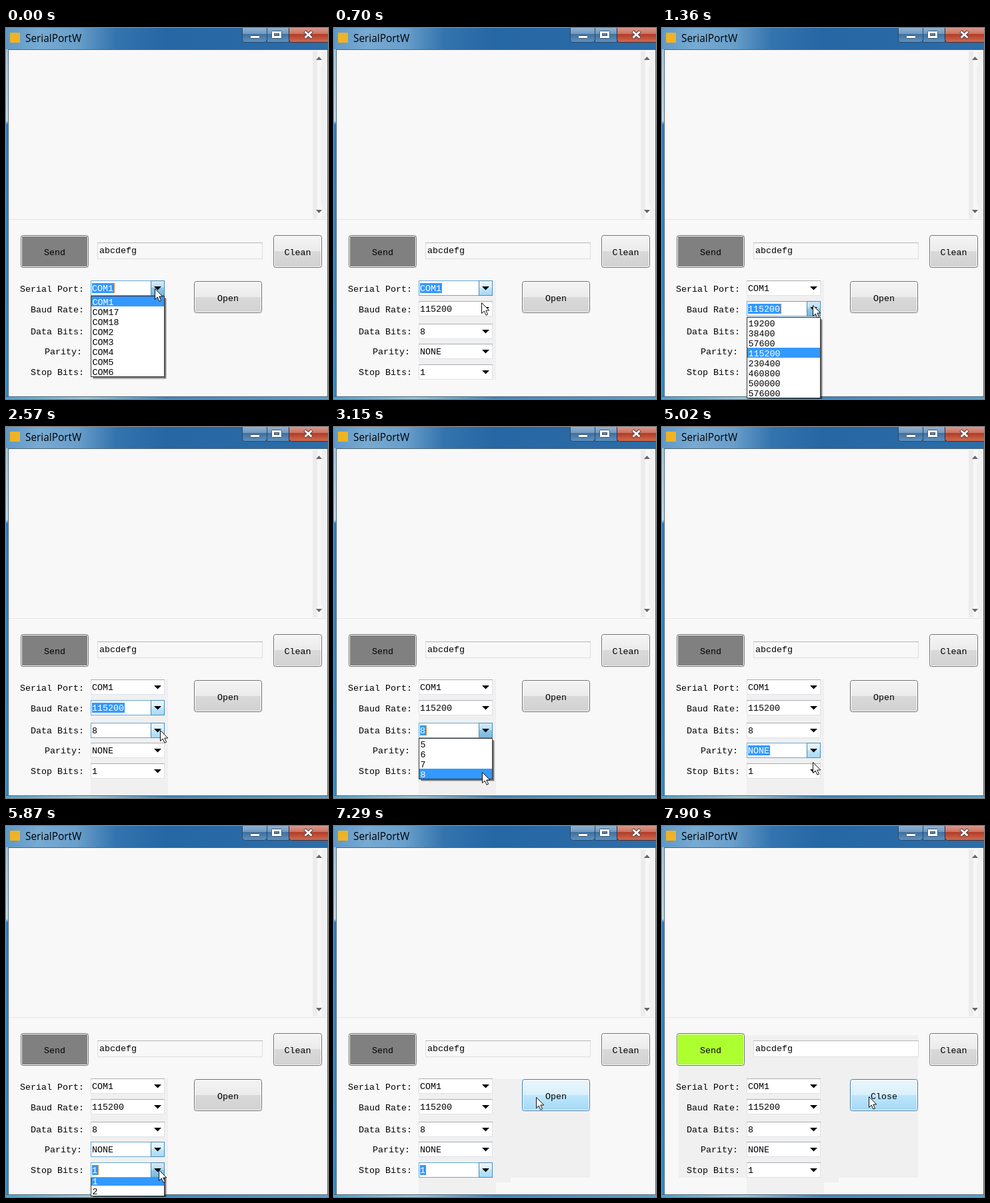
Recreate the animation shown at these times as an HTML page. Size 483 px wide and 557 px high, loop 8 s.

```html
<!DOCTYPE html>
<html lang="en">
<head>
<meta charset="utf-8">
<title>SerialPortW</title>
<style>
  html, body { margin: 0; width: 100%; height: 100%; overflow: hidden; }
  svg { display: block; width: 483px; height: 557px; }
  text { font: 13.333px "Liberation Mono", monospace; white-space: pre; }
  .title { font: 15.4px "Open Sans", "Noto Sans", sans-serif; }
</style>
</head>
<body>
<svg viewBox="0 0 483 557">
  <defs>
    <linearGradient id="bar">
      <stop offset="0" stop-color="#5f98c8"/><stop offset=".1" stop-color="#78aad2"/>
      <stop offset=".22" stop-color="#699fcb"/><stop offset=".34" stop-color="#3474ae"/>
      <stop offset=".5" stop-color="#2567a4"/><stop offset="1" stop-color="#2d6da8"/>
    </linearGradient>
    <linearGradient id="side" x2="0" y2="1">
      <stop offset="0" stop-color="#9cc3e0"/><stop offset=".25" stop-color="#c6dcec"/>
      <stop offset=".26" stop-color="#2f7fc4"/><stop offset="1" stop-color="#2c8fcb"/>
    </linearGradient>
    <linearGradient id="foot">
      <stop offset="0" stop-color="#4fa5d0"/><stop offset=".25" stop-color="#9cc9d8"/>
      <stop offset=".5" stop-color="#3e88bd"/><stop offset="1" stop-color="#5ca3cf"/>
    </linearGradient>
    <linearGradient id="glass" x2="0" y2="1">
      <stop offset="0" stop-color="#9dbdd9"/><stop offset=".48" stop-color="#7199c0"/>
      <stop offset=".5" stop-color="#3d6f9f"/><stop offset="1" stop-color="#5f93bf"/>
    </linearGradient>
    <linearGradient id="red" x2="0" y2="1">
      <stop offset="0" stop-color="#e0a699"/><stop offset=".48" stop-color="#cb7463"/>
      <stop offset=".5" stop-color="#b23a25"/><stop offset="1" stop-color="#cf6d50"/>
    </linearGradient>
    <linearGradient id="plain" x2="0" y2="1">
      <stop offset="0" stop-color="#f4f4f4"/><stop offset=".49" stop-color="#ebebeb"/>
      <stop offset=".5" stop-color="#d9d9d9"/><stop offset="1" stop-color="#d2d2d2"/>
    </linearGradient>
    <linearGradient id="hot" x2="0" y2="1">
      <stop offset="0" stop-color="#eaf6fd"/><stop offset=".49" stop-color="#d9f0fc"/>
      <stop offset=".5" stop-color="#bee6fd"/><stop offset="1" stop-color="#a7d9f5"/>
    </linearGradient>
    <linearGradient id="down" x2="0" y2="1">
      <stop offset="0" stop-color="#d6ebf7"/><stop offset=".49" stop-color="#b5ddf2"/>
      <stop offset=".5" stop-color="#8cc8e9"/><stop offset="1" stop-color="#78b8dc"/>
    </linearGradient>
  </defs>
  <g id="stage"></g>
</svg>
<script>
const LOOP = 8000;
const stage = document.getElementById('stage');

// Screen updates come in bursts: first time, last time, count.
const BURSTS = [
  [280, 1210, 8], [1360, 1750, 4], [2020, 2570, 5], [2720, 3020, 3], [3150, 3150, 1],
  [3420, 3990, 5], [4130, 4410, 3], [4560, 4720, 2], [5020, 5870, 7], [6030, 6170, 2],
  [6570, 7290, 6], [7440, 7590, 2], [7740, 7900, 2]
];
const STEPS = [0];
for (const [a, b, n] of BURSTS)
  for (let i = 0; i < n; i++) STEPS.push(Math.round(a + (n > 1 ? (b - a) * i / (n - 1) : 0)));

// Pointer path: time, x, y.
const PATH = [
  [0, 223, 391], [420, 219, 409], [560, 219, 410], [1080, 227, 419], [1360, 226, 416],
  [1500, 225, 440], [1750, 222, 486], [2020, 222, 486], [2570, 231, 455], [2870, 230, 455],
  [3150, 222, 518], [3420, 222, 518], [3990, 229, 482], [4270, 229, 484], [4410, 226, 503],
  [5020, 226, 503], [5560, 229, 515], [6170, 229, 517], [6570, 228, 529], [6860, 250, 515],
  [7290, 303, 407], [7590, 310, 406], [7900, 310, 406]
];

// hot / sel / open are [from, to] in ms; first is the top of the list's first row.
const COMBOS = [
  { y: 379, value: 'COM1', items: ['COM1', 'COM17', 'COM18', 'COM2', 'COM3', 'COM4', 'COM5', 'COM6'],
    first: 403, hot: [0, 1360], sel: [0, 1360], open: [0, 540] },
  { y: 410, value: '115200', items: ['19200', '38400', '57600', '115200', '230400', '460800', '500000', '576000'],
    first: 435, hot: [940, 3150], sel: [1360, 2870], open: [1360, 2020] },
  { y: 444, value: '8', items: ['5', '6', '7', '8'],
    first: 468, hot: [2430, 4720], sel: [2870, 4270], open: [2870, 3420] },
  { y: 474, value: 'NONE', items: ['NONE', 'ODD', 'EVEN'],
    first: 498, hot: [3840, 6170], sel: [4270, 5870], open: [4270, 5020] },
  { y: 505, value: '1', items: ['1', '2'],
    first: 525, hot: [5440, 7740], sel: [5870, 7740], open: [5870, 6570] }
];

// Repainted background areas: time, x, y, right, bottom.
const REPAINTS = [
  [280, 127, 379, 243, 528], [1360, 127, 379, 243, 557], [6850, 243, 380, 265, 535],
  [7140, 243, 380, 384, 528], [7740, 25, 314, 384, 528]
];

const within = ([a, b], t) => t >= a && t < b;
const rect = (x, y, w, h, fill, more = '') =>
  `<rect x="${x}" y="${y}" width="${w}" height="${h}" fill="${fill}" ${more}/>`;
const box = (x, y, w, h, fill, line, r = 0) =>
  rect(x + .5, y + .5, w - 1, h - 1, fill, `stroke="${line}" rx="${r}"`);
const label = (x, y, s, fill = '#000') => `<text x="${x}" y="${y}" fill="${fill}">${s}</text>`;
const path = (d, fill, more = '') => `<path d="${d}" fill="${fill}" ${more}/>`;

function button(x, y, w, h, fill, line, s) {
  return box(x, y, w, h, '#fcfcfc', line, 3) + rect(x + 2, y + 2, w - 4, h - 4, fill) +
    label(x + w / 2 - s.length * 4, y + 30, s);
}

function frameArt() {
  return rect(0, 0, 483, 557, 'url(#side)') + rect(0, 0, 483, 32, 'url(#bar)') +
    rect(6, 7, 15, 15, '#f0b323') +
    '<text class="title" x="29" y="21">SerialPortW</text>' +
    box(354, -4, 38, 26, 'url(#glass)', '#26486b', 4) +
    box(391, -4, 34, 26, 'url(#glass)', '#26486b') +
    box(424, -4, 63, 26, 'url(#red)', '#4a2730', 4) +
    box(366, 11, 15, 5, '#fff', '#44566b', 1) +
    box(398, 4, 16, 12, '#fff', '#44566b', 1) + box(402, 8, 8, 4, '#5b87b0', '#44566b') +
    path('M448 5l11 10M459 5l-11 10', 'none', 'stroke="#54404a" stroke-width="5"') +
    path('M448.500 5.500l10 9M458.500 5.500l-10 9', 'none', 'stroke="#fff" stroke-width="3"') +
    box(3, 32, 480, 522, '#f8f8f8', '#4d6478') +
    rect(4, 287, 477, 1, '#e6e6e6') +
    rect(460, 35, 7, 251, '#ececec') + rect(467, 35, 7, 251, '#f7f7f7') + rect(474, 35, 6, 251, '#f1f1f1') +
    rect(473, 56, 1, 210, '#e8e8e8') +
    path('M465 48l4.500-5 4.500 5z', '#666') + path('M465 273l4.500 5 4.500-5z', '#666');
}

function combo(c, t) {
  const { y, value } = c, open = within(c.open, t), sel = within(c.sel, t);
  const fade = !within(c.hot, t) ? 0 : t < c.sel[1] ? 1 : (c.hot[1] - t) / (c.hot[1] - c.sel[1]);
  const w = value.length * 8 + 1;
  let s = box(127, y, 111, 23, '#fff', '#dfe1e6') + rect(127, y, 111, 1, '#abadb3');
  if (fade) s += `<g opacity="${fade}">` + box(127, y, 111, 23, '#fff', '#6aa8d2') +
    box(217, y, 21, 23, open ? 'url(#down)' : 'url(#hot)', '#4a8bb8') + '</g>';
  if (sel) s += open ? box(129, y + 4, w + 1, 15, '#39f', '#e08a2c') + rect(129, y + 4, w, 15, '#39f')
                     : rect(129, y + 4, w, 15, '#39f');
  return s + label(129, y + 16, value, sel ? '#fff' : '#000') +
    path(`M222 ${y + 9}h11l-5.500 5.500z`, '#000');
}

function list(c) {
  const h = c.items.length * 15 + 1, top = c.first - 1;
  return rect(131, top + 4, 110, h, '#000', 'opacity=".18"') + rect(130, top + 3, 110, h, '#000', 'opacity=".4"') +
    box(127, top, 111, h + 1, '#fff', '#333') +
    c.items.map((s, i) => {
      const on = s === c.value, y = c.first + i * 15;
      return (on ? rect(128, y, 109, 15, '#39f') : '') + label(129.5, y + 13, s, on ? '#fff' : '#000');
    }).join('');
}

function pointer(t) {
  let i = 1;
  while (i < PATH.length - 1 && PATH[i][0] <= t) i++;
  const [a, x0, y0] = PATH[i - 1], [b, x1, y1] = PATH[i];
  const k = Math.min(1, (t - a) / (b - a));
  const x = Math.round(x0 + (x1 - x0) * k), y = Math.round(y0 + (y1 - y0) * k);
  return path(`M${x + .5} ${y + .5}v16l3.700-3.500 2.800 6.200 2.600-1.200-2.800-6h5z`, '#fff',
    'stroke="#111" stroke-width="1"');
}

const ART = frameArt();

function draw(t) {
  const live = t >= 7900, over = t >= 7140, press = t >= 7740 && !live;
  let s = ART;
  for (const [at, x, y, r, b] of REPAINTS) if (t >= at) s += rect(x, y, r - x, b - y, '#f0f0f0');
  s += rect(0, 553, 483, 1, '#4d6478') + rect(0, 554, 483, 3, 'url(#foot)');
  s += button(22, 311, 102, 49, live ? '#adff2f' : '#808080', '#707070', 'Send') +
    box(137, 322, 248, 25, live ? '#fff' : '#f8f8f8', '#dedede') + rect(137, 322, 248, 1, '#b4b6bb') +
    label(140, 338, 'abcdefg') +
    button(401, 311, 73, 49, 'url(#plain)', '#707070', 'Clean') +
    button(282, 380, 102, 48, press ? 'url(#down)' : over ? 'url(#hot)' : 'url(#plain)',
      over ? '#3c7fb1' : '#707070', live ? 'Close' : 'Open') +
    label(21, 396, 'Serial Port:') + label(37, 427, 'Baud Rate:') + label(37, 460, 'Data Bits:') +
    label(58, 490, 'Parity:') + label(37, 521, 'Stop Bits:');
  const opened = COMBOS.find(c => within(c.open, t));
  for (const c of COMBOS) if (c !== opened) s += combo(c, t);
  if (opened) s += list(opened) + combo(opened, t);
  stage.innerHTML = s + pointer(t);
}

let shown = -1;
function tick(now) {
  const t = now % LOOP;
  let step = 0;
  for (const at of STEPS) if (at <= t) step = at;
  if (step !== shown) draw(shown = step);
  requestAnimationFrame(tick);
}
tick(performance.now());
</script>
</body>
</html>
```
